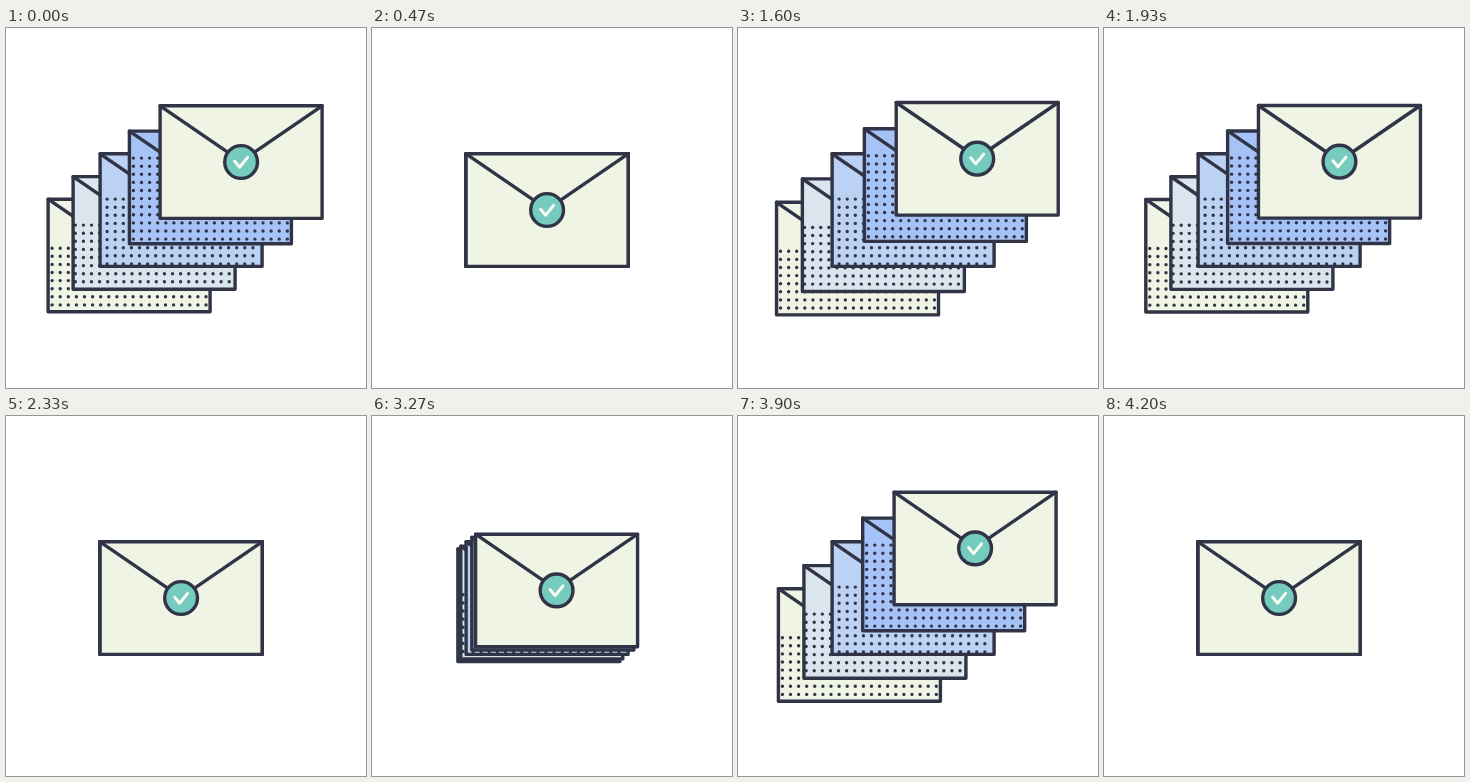
These frames come from a looping animation (360x360 px, 5.13 s). An HTML page:

```html
<!DOCTYPE html>
<html lang="en">
<head>
<meta charset="utf-8">
<title>Envelopes</title>
<style>
html, body { margin: 0; width: 100%; height: 100%; overflow: hidden; background: #fff; }
svg { display: block; width: 100%; height: 100%; }
</style>
</head>
<body>
<svg id="stage" viewBox="0 0 360 360"></svg>
<script>
const LOOP = 5130;
const INK = '#303446';
const HOME = { x: 94.1, y: 125.8 };
const SIZE = { w: 162, h: 112.6 };
const GAP = 8.1;

// The inner envelopes spring a little faster and further than the outer ones.
const OUTER = { peak: 1.07, rise: 180 };
const INNER = { peak: 1.11, rise: 150 };
const SETTLE = 450;

// Back to front: offset when fanned out, fill, origin of the dot grid.
const envelopes = [
  { dx: -52, dy: 45.4, fill: '#f0f4e5', spring: OUTER, dots: [4, 49] },
  { dx: -27, dy: 22.8, fill: '#dae5ee', spring: INNER, dots: [2.2, 48.5] },
  { dx: 0, dy: 0, fill: '#bbd2f4', spring: INNER, dots: [7, 45.3] },
  { dx: 29.3, dy: -22.7, fill: '#a6c3f7', spring: INNER, dots: [4, 27] },
  { dx: 60, dy: -48, fill: '#f0f4e5', spring: OUTER, seal: true }
];

const opening = i => 17 + i * 37.5;
const closing = i => 400 - i * 40;

const moves = [
  { from: 70, step: 40, last: 10, phase: closing },
  { from: 1370, step: 41.6, last: 12, phase: opening },
  { from: 1930, step: 40, last: 10, phase: closing },
  { from: 3270, step: 37, last: 12, phase: opening },
  { from: 3800, step: 40, last: 10, phase: closing }
];

const stage = document.getElementById('stage');

function add(parent, name, attrs) {
  const node = document.createElementNS('http://www.w3.org/2000/svg', name);
  for (const key in attrs) node.setAttribute(key, attrs[key]);
  parent.appendChild(node);
  return node;
}

function dotPath([x0, y0]) {
  let d = '';
  for (let y = y0; y < SIZE.h - 2; y += GAP)
    for (let x = x0; x < SIZE.w - 2; x += GAP)
      d += `M${x.toFixed(1)} ${y.toFixed(1)}h0`;
  return d;
}

function build(env) {
  const { w, h } = SIZE;
  const line = { fill: 'none', stroke: INK, 'stroke-width': 3.4, 'stroke-linejoin': 'round', 'stroke-linecap': 'round' };
  const g = add(stage, 'g', {});
  add(g, 'rect', { width: w, height: h, fill: env.fill });
  if (env.dots) add(g, 'path', { ...line, d: dotPath(env.dots) });
  add(g, 'path', { ...line, d: `M0 0L${w / 2} 55.5L${w} 0` });
  add(g, 'rect', { ...line, width: w, height: h });
  if (env.seal) {
    add(g, 'circle', { ...line, cx: w / 2, cy: 56.2, r: 16.4, fill: '#76cbbf' });
    add(g, 'path', { ...line, d: 'M74.5 55.3L79.5 61.4L87.5 51.6', stroke: '#f8fbf2', 'stroke-width': 3 });
  }
  return g;
}

const easeInOut = p => (1 - Math.cos(Math.PI * Math.min(1, Math.max(0, p)))) / 2;

// Shoot out past the end, then settle; closing runs it backwards.
function fan(ms, { peak, rise }) {
  if (ms < rise) return peak * Math.sin(Math.PI / 2 * ms / rise);
  return peak - (peak - 1) * easeInOut((ms - rise) / (SETTLE - rise));
}

function phaseAt(t) {
  const move = moves.filter(m => t >= m.from).pop();
  if (!move) return SETTLE;
  const i = Math.floor((t - move.from) / move.step + 1e-6);
  return move.phase(Math.min(i, move.last));
}

const groups = envelopes.map(build);

function draw(t) {
  const phase = phaseAt(t);
  envelopes.forEach((env, i) => {
    const s = fan(phase, env.spring);
    const x = HOME.x + env.dx * s, y = HOME.y + env.dy * s;
    groups[i].setAttribute('transform', `translate(${x.toFixed(2)} ${y.toFixed(2)})`);
  });
}

const start = performance.now();
function tick() {
  draw((performance.now() - start) % LOOP);
  requestAnimationFrame(tick);
}
draw(0);
requestAnimationFrame(tick);
</script>
</body>
</html>
```
